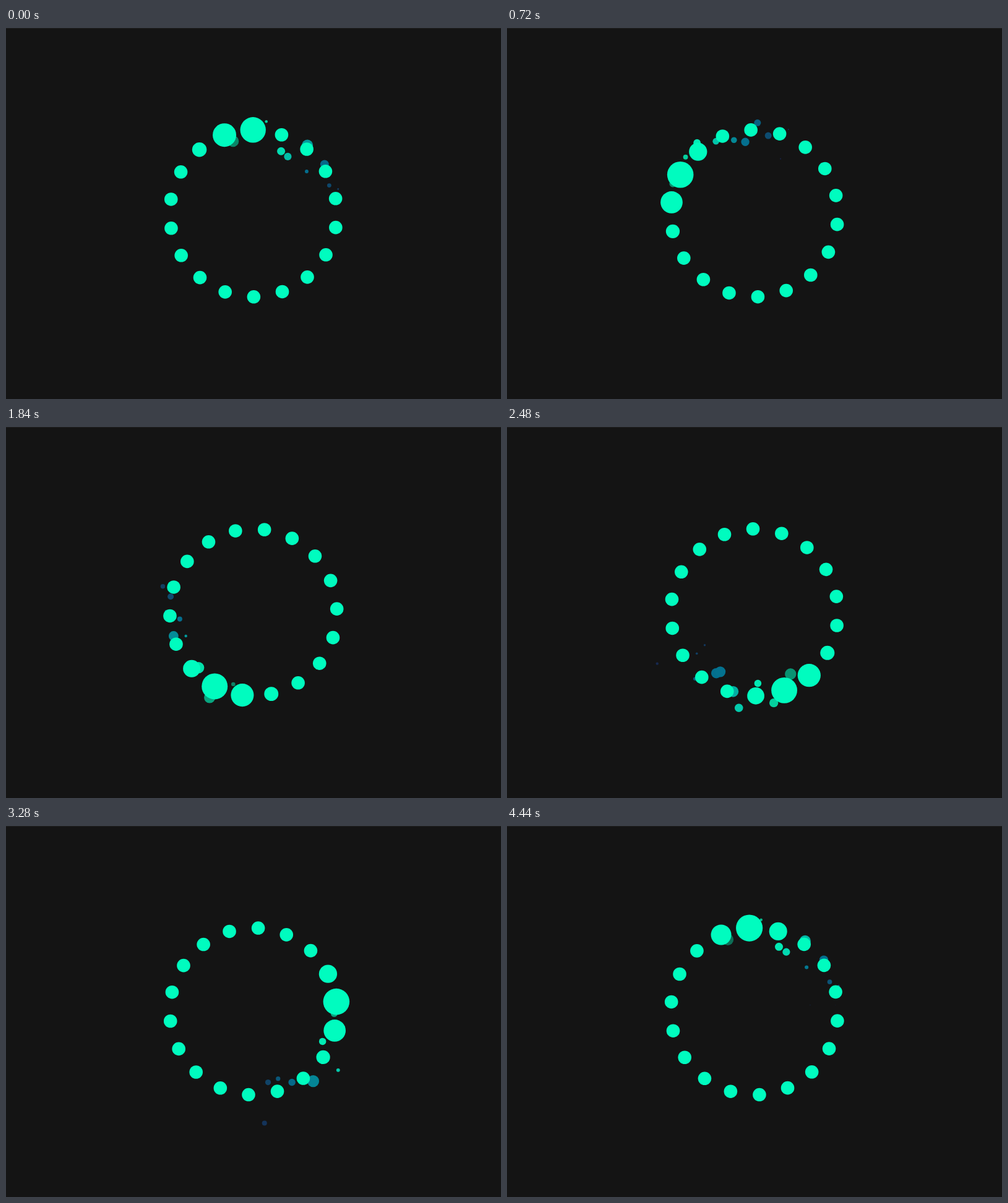
Animation of 800x600 px, one loop 4480 ms. Source, as an HTML page:

```html
<!DOCTYPE html>
<html lang="en">
<head>
<meta charset="utf-8">
<title>Ring loader</title>
<style>
  html, body { margin: 0; width: 100%; height: 100%; overflow: hidden; background: #141414; }
  svg { display: block; width: 100vw; height: 100vh; }
</style>
</head>
<body>
<svg id="stage" viewBox="0 0 800 600">
  <rect width="800" height="600" fill="#141414"/>
  <rect width="800" height="1" fill="#1f1f1f"/>
  <g id="sparks"></g>
  <g id="dots" fill="#00fcbf"></g>
</svg>
<script>
const FRAMES = 112, FRAME_MS = 40, STEP = 360 / FRAMES;
const CX = 399.8, CY = 299.8, RING = 135;
const DOTS = 18, DOT_R = 10.8, PULSE = 6.2, STAGGER = 3.08;
const SPARKS = 64, LIFE = 19.5, DRIFT = 46, LEAD = 14;

const mod = (a, b) => ((a % b) + b) % b;
const clamp = (v, lo = 0, hi = 1) => Math.min(hi, Math.max(lo, v));
const mix = (a, b, f) => a.map((v, i) => Math.round(v + (b[i] - v) * f));
const easeOut = u => u * (2 - u);
const smooth = u => u * u * (3 - 2 * u);

// The wave runs against the turn of the ring.
const waveAngle = n => -99.7 - STEP * n;

const GREEN = [2, 245, 186], BLUE = [4, 110, 142], NAVY = [26, 30, 70];

function sparkColor(u) {
  const rgb = u < .6 ? mix(GREEN, BLUE, smooth(clamp((u - .25) / .35)))
                     : mix(BLUE, NAVY, (u - .6) / .4);
  return `rgb(${rgb})`;
}

function addCircle(parent) {
  const c = document.createElementNS("http://www.w3.org/2000/svg", "circle");
  document.getElementById(parent).append(c);
  return c;
}

function place(node, deg, dist, r) {
  const a = deg * Math.PI / 180;
  node.setAttribute("cx", (CX + dist * Math.cos(a)).toFixed(2));
  node.setAttribute("cy", (CY + dist * Math.sin(a)).toFixed(2));
  node.setAttribute("r", r.toFixed(2));
}

let seed = 7;
const random = () => (seed = seed * 16807 % 2147483647) / 2147483647;

const sparks = Array.from({ length: SPARKS }, (_, i) => ({
  node: addCircle("sparks"),
  birth: (i + random()) * FRAMES / SPARKS,
  offset: (random() + random() - 1) * 55,
  size: 2 + 8 * random() ** 1.3
}));
const dots = Array.from({ length: DOTS }, () => addCircle("dots"));

// Each dot swells twice per loop as the wave passes it.
function dotRadius(i, n) {
  const peak = STAGGER * i - 1.1;
  const gap = Math.min(...[0, 1, 2].map(k => Math.abs(n - peak - k * FRAMES / 2)));
  return DOT_R * (1 + smooth(clamp(1 - gap / PULSE)));
}

function drawSpark({ node, birth, offset, size }, n) {
  const u = mod(n - birth, FRAMES) / LIFE;
  node.style.display = u < 1 ? "" : "none";
  if (u >= 1) return;
  const deg = waveAngle(birth) - LEAD + DRIFT * easeOut(u);
  place(node, deg, RING + offset * (.3 + .7 * easeOut(u)), size * (1 - u ** 5));
  node.setAttribute("fill", sparkColor(u));
  node.setAttribute("opacity", clamp(.4 + 2 * u).toFixed(2));
}

function draw(n) {
  dots.forEach((dot, i) =>
    place(dot, -90.25 - i * 360 / DOTS + STEP * n, RING, dotRadius(i, n)));
  sparks.forEach(spark => drawSpark(spark, n));
}

const start = performance.now();
function tick() {
  draw(Math.floor((performance.now() - start) / FRAME_MS) % FRAMES);
  requestAnimationFrame(tick);
}
tick();
</script>
</body>
</html>
```
